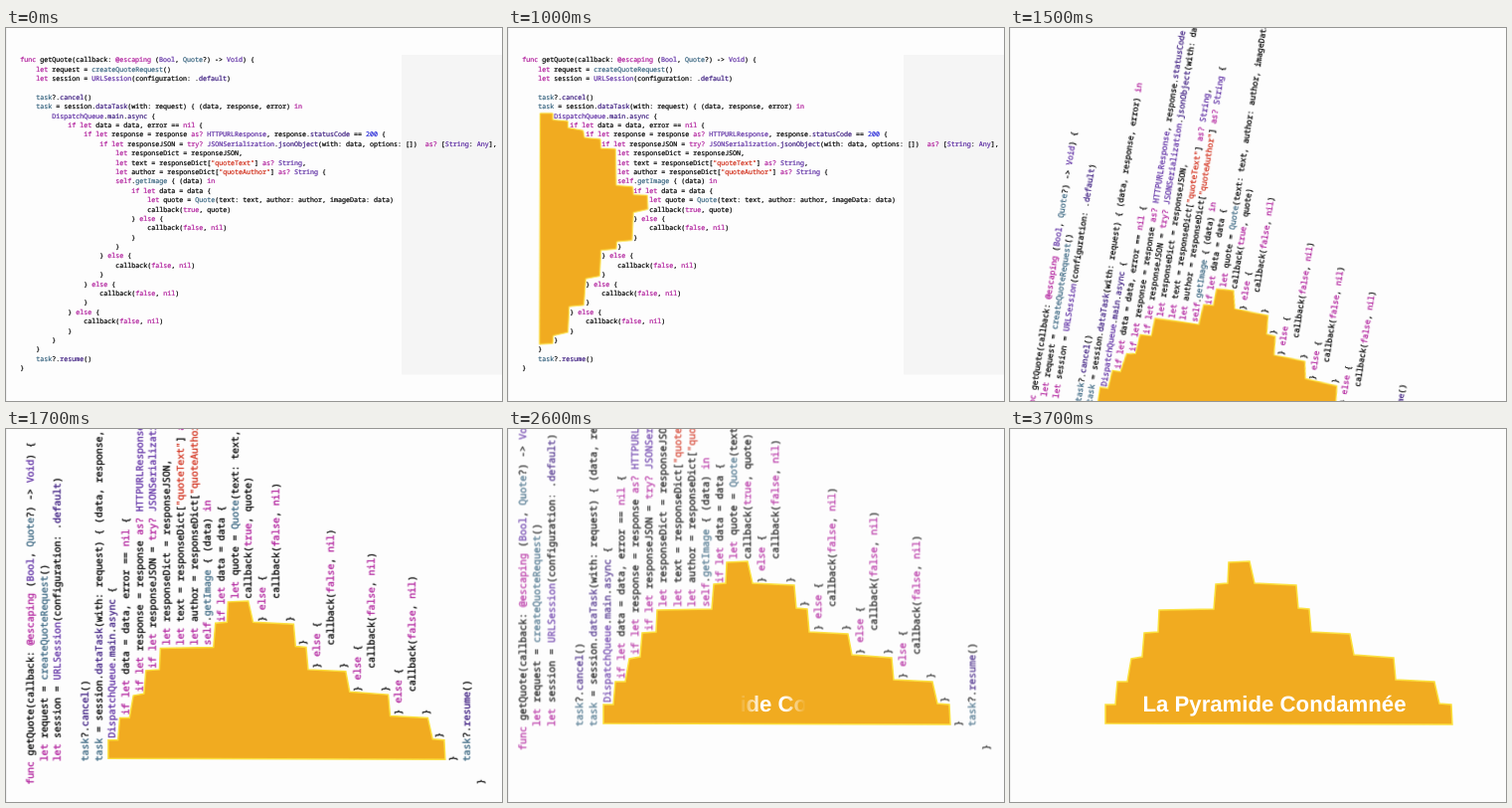
Write an HTML page that moves like this. It is 499 px wide and 375 px high and loops after 3900 ms.

```html
<!DOCTYPE html>
<html lang="fr">
<head>
<meta charset="utf-8">
<title>La Pyramide Condamnée</title>
<style>
  html, body { margin: 0; width: 100%; height: 100%; overflow: hidden; background: #fdfdfd; }
  svg { display: block; width: 499px; height: 375px; }
  #page { transform-box: view-box; transform-origin: 249.5px 187.5px; }
  #code text {
    font: 500 6.667px "Noto Sans Mono", "DejaVu Sans Mono", monospace;
    white-space: pre;
    text-rendering: geometricPrecision;
    font-variant-ligatures: none;
    color: #000;
  }
  #code text, #code tspan { fill: currentColor; stroke: currentColor; stroke-width: .22px; }
  #code .str { color: #d12f1b; }
  #code .key { color: #b01f9c; }
  #code .type { color: #5f2fa4; }
  #code .call { color: #3e1e81; }
  #code .own { color: #3a6680; }
  #code .num { color: #272ad8; }
  #title {
    position: absolute; left: 110px; top: 260px; width: 312px; height: 34px;
    font: bold 22.2px/34px "Liberation Sans", Arial, sans-serif;
    text-align: center; white-space: nowrap; color: #fff;
    text-rendering: geometricPrecision;
    mask: linear-gradient(90deg, transparent, #000 22px, #000 calc(100% - 22px), transparent) center / 0 100% no-repeat;
  }
</style>
</head>
<body>
<svg viewBox="0 0 499 375">
  <rect width="1" height="375" fill="#f2f2f2"/>
  <g id="page">
    <g id="code"><rect x="398" y="27" width="300" height="321.5" fill="#f5f5f5"/></g>
    <!-- drawn upright, then laid on its side along the indentation -->
    <polygon id="pyramid" transform="matrix(0 .6653 -.6653 0 229.2 21.83)"
      fill="#f1ab20" stroke="#fbe03a" stroke-width="1.5"
      points="96,277 106,277 108,254 118,254 122,231 133,229 135,205 149,204 150,182 205,181
              207,156 219,155 220,134 241,133 246,155 288,157 290,180 301,181 303,204 342,206
              346,227 386,230 388,252 427,254 432,276 444,277 445,297 96,296"/>
  </g>
</svg>
<div id="title">La Pyramide Condamnée</div>

<script>
const LOOP = 3900;
const SMOOTH = 'cubic-bezier(.333, 0, .667, 1)';
const CHAR = 4, LINE = 9.394, LEFT = 14.3, BASE = 34.2;

const source = `func getQuote(callback: @escaping (Bool, Quote?) -> Void) {
    let request = createQuoteRequest()
    let session = URLSession(configuration: .default)

    task?.cancel()
    task = session.dataTask(with: request) { (data, response, error) in
        DispatchQueue.main.async {
            if let data = data, error == nil {
                if let response = response as? HTTPURLResponse, response.statusCode == 200 {
                    if let responseJSON = try? JSONSerialization.jsonObject(with: data, options: [])  as? [String: Any],
                        let responseDict = responseJSON,
                        let text = responseDict["quoteText"] as? String,
                        let author = responseDict["quoteAuthor"] as? String {
                        self.getImage { (data) in
                            if let data = data {
                                let quote = Quote(text: text, author: author, imageData: data)
                                callback(true, quote)
                            } else {
                                callback(false, nil)
                            }
                        }
                    } else {
                        callback(false, nil)
                    }
                } else {
                    callback(false, nil)
                }
            } else {
                callback(false, nil)
            }
        }
    }
    task?.resume()
}`;

const token = new RegExp([
  '(?<str>"[^"]*")',
  '(?<key>@escaping|\\b(?:as|try)\\?|\\b(?:func|let|if|else|in|self|true|false|nil)\\b)',
  '(?<type>\\b(?:Bool|Void|String|Any|URLSession|HTTPURLResponse|JSONSerialization|DispatchQueue)\\b)',
  '(?<call>\\b(?:main|async|dataTask|jsonObject|statusCode|default|cancel|resume)\\b)',
  '(?<own>\\b(?:Quote|createQuoteRequest|task|getImage)\\b)',
  '(?<num>\\b\\d+\\b)'
].join('|'), 'g');

const $ = id => document.getElementById(id);

function svg(tag, parent, attrs, text = '') {
  const el = document.createElementNS('http://www.w3.org/2000/svg', tag);
  for (const name in attrs) el.setAttribute(name, attrs[name]);
  el.textContent = text;
  return parent.appendChild(el);
}

source.split('\n').forEach((line, row) => {
  const code = line.trimStart();
  if (!code) return;
  const indent = line.length - code.length;
  const text = svg('text', $('code'), { x: LEFT + indent * CHAR, y: BASE + row * LINE });
  let last = 0;
  for (const m of code.matchAll(token)) {
    text.append(code.slice(last, m.index));
    const kind = Object.keys(m.groups).find(k => m.groups[k]);
    svg('tspan', text, { class: kind }, m[0]);
    last = m.index + m[0].length;
  }
  text.append(code.slice(last));
});

// steps: [time, value, easing to the next step]
function play(id, prop, steps) {
  const first = steps[0], end = steps[steps.length - 1];
  const all = [[0, first[1]], ...steps, [LOOP, end[1]]];
  $(id).animate(
    all.map(([time, value, easing = 'linear']) => ({ offset: time / LOOP, [prop]: value, easing })),
    { duration: LOOP, iterations: Infinity }
  );
}

play('pyramid', 'opacity', [[100, 0], [600, 1]]);
play('page', 'rotate', [[1050, '0deg', SMOOTH], [1610, '-90deg']]);
play('page', 'scale', [[1250, '1', SMOOTH], [1800, '1.503']]);
play('page', 'translate', [
  [1050, '0px 0px', SMOOTH],
  [1300, '2.5px 6.5px', 'cubic-bezier(.4, 0, .7, .675)'],
  [1700, '2px -173px', 'cubic-bezier(.3, .55, .6, 1)'],
  [1876, '-.5px -218px']
]);
play('code', 'opacity', [[2450, 1], [3300, 0]]);
play('title', 'maskSize', [[2500, '0px 100%'], [2900, '264px 100%'], [2990, '360px 100%']]);
</script>
</body>
</html>
```
